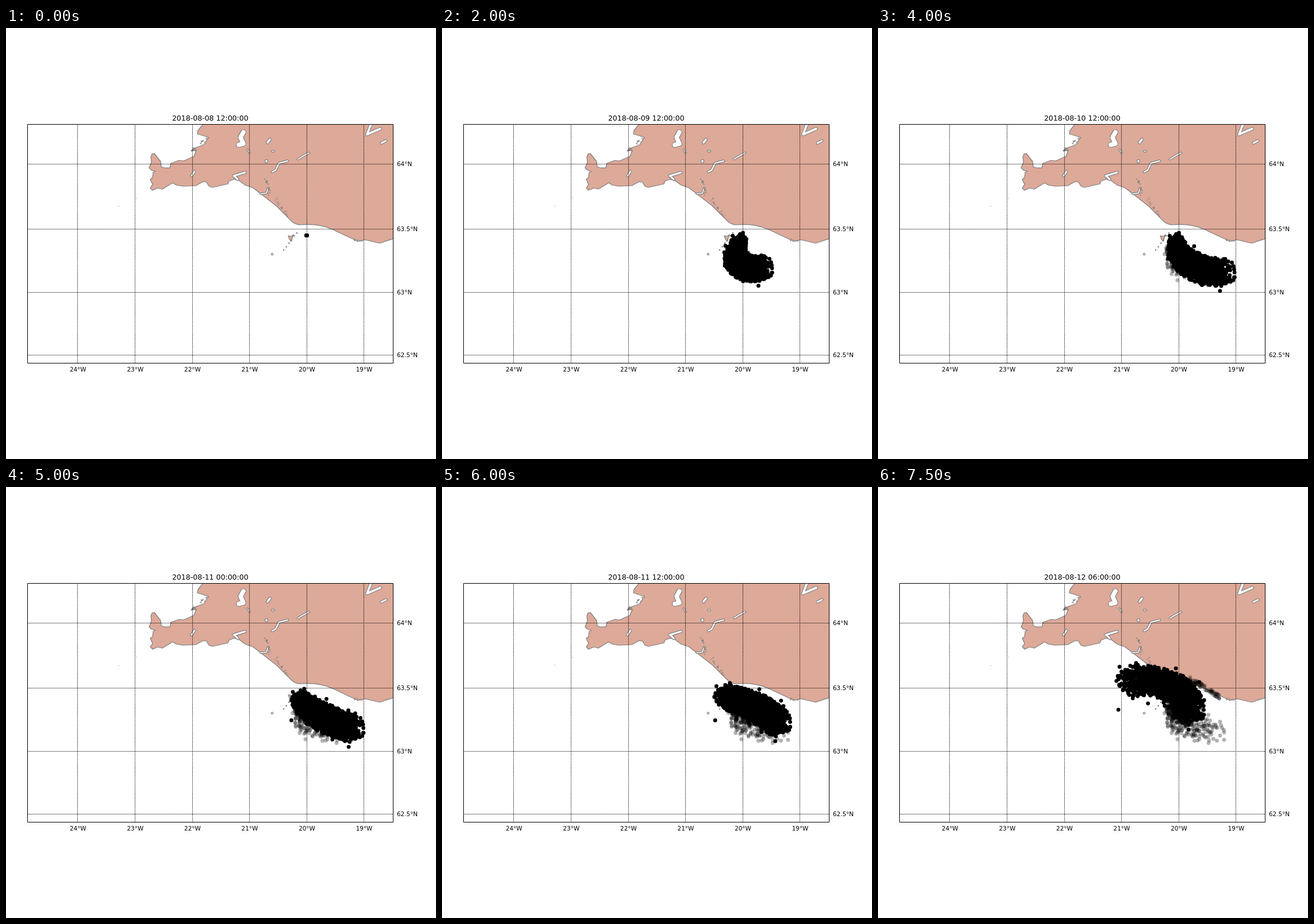
These frames come from a looping animation (748 by 749 pixels, 8000 ms). An HTML page with a canvas:

```html
<!DOCTYPE html>
<html lang="en">
<head>
<meta charset="utf-8">
<title>Particle drift</title>
<style>
  html, body { margin: 0; width: 100%; height: 100%; overflow: hidden; background: #fff; }
  svg, canvas { position: absolute; left: 0; top: 0; width: 748px; height: 749px; }
  text { font: 10.42px "DejaVu Sans", sans-serif; }
  #title { font-size: 12.5px; }
  .mid { text-anchor: middle; }
  #map { fill: none; stroke: #808080; stroke-width: 1.25; stroke-linejoin: round; stroke-linecap: round; }
  #map .land { fill: #dda998; }
  #map .water { stroke: #fff; }
  #grid { stroke: #000; stroke-width: 1.04; stroke-dasharray: 1.04; }
</style>
</head>
<body>
<svg viewBox="0 0 748 749">
  <clipPath id="box"><path d="M37.5 167.5H673.5V582.5H37.5Z"/></clipPath>
  <g id="map" clip-path="url(#box)"></g>
  <g id="grid"></g>
  <path d="M37.5 167.5H673.5V582.5H37.5Z" fill="none" stroke="#000"/>
  <g id="labels"></g>
  <text id="title" class="mid" x="355.3" y="161"></text>
</svg>
<canvas id="cloud" width="748" height="749"></canvas>
<script>
const $ = id => document.getElementById(id);

function add(parent, tag, attrs, text) {
  const el = document.createElementNS('http://www.w3.org/2000/svg', tag);
  for (const key in attrs) el.setAttribute(key, attrs[key]);
  if (text) el.textContent = text;
  return $(parent).appendChild(el);
}

function random(seed) {
  return () => {
    seed = (seed + 0x6D2B79F5) | 0;
    let t = Math.imul(seed ^ (seed >>> 15), 1 | seed);
    t = (t + Math.imul(t ^ (t >>> 7), 61 | t)) ^ t;
    return ((t ^ (t >>> 14)) >>> 0) / 4294967296;
  };
}
const rnd = random(41);
const mix = (a, b, u) => a + (b - a) * u;

// Land: western bay, peninsula, then the smooth southern shore
const west = 'M343 160V167L334 178 333 184 352 190 344 203 330 208 322 214 331 213 327 223 309 231 301 230 287 235 285 243 275 243 270 241 269 232 258 218 254 219 252 224 253 233 249 243 253 247 260 249 256 251 255 260 251 263 255 272 251 278 255 282 264 278 272 280 ';
const shore = '290 269 296 273 308 275 330 274 343 267 349 268 353 275 359 277 386 271 388 266 396 263 404 264 416 273 430 278 470 309 495 334Q503 342 512 342 545 339 570 351L604 367 612 371 624 368 650 374 680 364V160Z';
add('map', 'path', { class: 'land', d: west + shore });

// Lakes: a water course and its width
const lakes = [
  ['M413 181 408 190 413 201 405 203', 8],
  ['M420 211 424 217', 1.5],
  ['M396 257 416 251M397 257 403 263', 3.5],
  ['M328 249 323 257', 3],
  ['M459 194 455 199', 4],
  ['M463 214 466 214', 2],
  ['M453 231 453 232', 4],
  ['M463 250 469 247 475 235 490 231', 2.5],
  ['M508 228 516 223 527 217', 2],
  ['M638 160 633 172 628 185 651 175', 4],
  ['M653 200 661 196', 3],
  ['M443 288 453 287 456 278', 2]
];
for (const [d, w] of lakes) {
  add('map', 'path', { d, 'stroke-width': w + 2, style: `stroke-width:${w + 2}` });
  add('map', 'path', { d, class: 'water', style: `stroke-width:${w - .4}` });
}

// Ragged places: short random strokes along a line
function ragged(x0, y0, x1, y1, spread, count) {
  for (let i = 0; i < count; i++) {
    const u = rnd();
    const x = mix(x0, x1, u) + (rnd() - .5) * spread;
    const y = mix(y0, y1, u) + (rnd() - .5) * spread;
    add('map', 'path', { d: `M${x} ${y}l${rnd() * 4 - 2} ${rnd() * 4 - 2}` });
  }
}
ragged(322, 212, 331, 211, 4, 10);
ragged(335, 200, 351, 192, 7, 12);
ragged(453, 262, 459, 291, 4, 18);
ragged(466, 295, 490, 326, 4, 16);
ragged(606, 369, 620, 370, 3, 7);

// Offshore islands, strung out to the south-west
add('map', 'path', { class: 'land', d: 'M491 361 497 362 500 359 496 371 493 367Z' });
add('map', 'circle', { cx: 463, cy: 393, r: 1.6 });
for (let i = 0; i < 6; i++)
  add('map', 'circle', { cx: 506 - i * 4.6, cy: 357 + i * 6 - rnd() * 2, r: .7 });
add('map', 'circle', { cx: 196, cy: 310, r: .2 });
add('map', 'circle', { cx: 227, cy: 296, r: .2 });

// Mercator grid
const perDegree = 99.55;
const rad = Math.PI / 180;
const mercator = lat => Math.log(Math.tan(Math.PI / 4 + lat * rad / 2)) / rad;
for (let lon = 24; lon >= 19; lon--) {
  const x = 124.9 + (24 - lon) * perDegree;
  add('grid', 'path', { d: `M${Math.floor(x) + .5} 582.5V167.5` });
  add('labels', 'text', { class: 'mid', x: x + .4, y: 597 }, lon + '°W');
}
for (let lat = 64; lat > 62; lat -= .5) {
  const y = 236.7 + (mercator(64) - mercator(lat)) * perDegree;
  add('grid', 'path', { d: `M37.5 ${Math.floor(y) + .5}H673.5` });
  add('labels', 'text', { x: 680, y: y + 3.6 }, lat + '°N');
}

// The cloud is a bent ribbon from tail to head; its ends and bend drift with the step
const { sin, cos, sqrt, PI, min, max } = Math;

function ribbon(step) {
  const left = min(1, step), late = max(0, step - 8);
  const tail = [523 - 5 * left - 1.65 * late ** 2, 360.5 + 9 * left - .1 * late ** 3];
  const head = [523 + 82 * sin(PI * step / 18) ** 2, 360.5 + 66 * sin(PI * (step / 19) ** .7)];
  const bow = sin(2 * PI * step / 22);
  const bend = [(tail[0] + head[0]) / 2 - 24 * bow, (tail[1] + head[1]) / 2 + 16 * bow];
  const grow = min(1, (step / 4) ** .6);
  const thin = (13 + 2.1 * late) * grow, wide = (22 + .35 * step) * grow;

  return ({ t, a, r }) => {
    const at = i => tail[i] * (1 - t) * (1 - 2 * t) + bend[i] * 4 * t * (1 - t) + head[i] * t * (2 * t - 1);
    const reach = r * mix(thin, wide, min(1, t * 2.2));
    return [at(0) + cos(a) * reach, at(1) + sin(a) * reach];
  };
}

// Radii fill the ribbon evenly, with a thin tail of strays outside
const particle = () => ({
  t: rnd(),
  a: rnd() * 2 * PI,
  r: sqrt(rnd()) * .98 + max(0, -Math.log(rnd()) - 2.6) * .17
});
const drifters = Array.from({ length: 1500 }, particle);

// Some stop where the ribbon passed, others are beached on the southern shore
const settled = Array.from({ length: 520 }, () => {
  const since = .6 + 10.4 * rnd() ** 1.2;
  const p = particle();
  p.t **= 1.3;
  p.r *= .85;
  return [...ribbon(since)(p), since];
});
for (let i = 0; i < 60; i++) {
  const u = rnd();
  settled.push([mix(542, 594, u), mix(329, 360, u) + rnd() * 8, 12 + rnd() * 3]);
}

const ctx = $('cloud').getContext('2d');
function spot([x, y]) {
  ctx.beginPath();
  ctx.arc(x, y, 3.4, 0, 2 * PI);
  ctx.fill();
}

function draw(step) {
  const date = new Date(Date.UTC(2018, 7, 8, 12 + step * 6));
  $('title').textContent = date.toISOString().slice(0, 19).replace('T', ' ');
  ctx.clearRect(0, 0, 748, 749);
  ctx.fillStyle = 'rgba(0,0,0,.3)';
  settled.filter(p => p[2] <= step).forEach(spot);
  ctx.fillStyle = '#000';
  drifters.map(ribbon(step)).forEach(spot);
}

let shown = -1;
const start = performance.now();
function tick() {
  const step = Math.floor((performance.now() - start) % 8000 / 500);
  if (step !== shown) draw(shown = step);
  requestAnimationFrame(tick);
}
tick();
</script>
</body>
</html>
```
